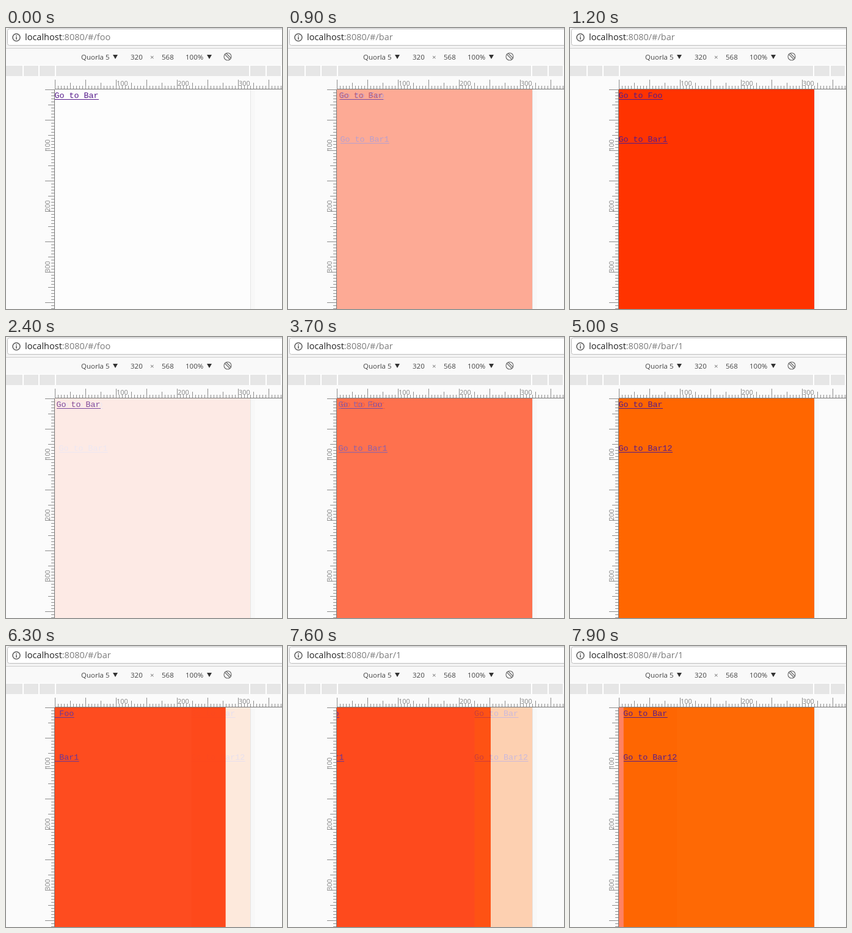
Animation of 452x462 px, one loop 8000 ms. Source, as an HTML page:

```html
<!DOCTYPE html>
<html lang="en">
<head>
<meta charset="utf-8">
<title>Route transitions</title>
<style>
  html, body { margin: 0; width: 100%; height: 100%; overflow: hidden; background: #fbfbfb; }
  svg { display: block; width: 452px; height: 462px; }
  text { white-space: pre; }
  .url { font: 14.5px "Open Sans", "Noto Sans", sans-serif; fill: #222; }
  .url .path { fill: #7c7c7c; }
  .bar { font: 11.5px "Open Sans", "Noto Sans", sans-serif; fill: #444; }
  .ruler { font: 11px "Open Sans", "Noto Sans", sans-serif; fill: #858585; }
  .link { font: 13.333px "Liberation Mono", monospace; }
</style>
</head>
<body>
<svg width="452" height="462">
  <defs><clipPath id="screen"><rect x="80" y="101" width="320" height="361"/></clipPath></defs>
  <rect width="452" height="462" fill="#fbfbfb"/>

  <!-- address bar -->
  <rect width="452" height="34" fill="#f3f3f3"/>
  <rect x="2.5" y="1.5" width="470" height="27" rx="3" fill="#fff" stroke="#bdbdbd"/>
  <rect y="33" width="452" height="1" fill="#d0d0d0"/>
  <circle cx="17" cy="15.5" r="6" fill="none" stroke="#5a5a5a" stroke-width="1.5"/>
  <path d="M17 14.5v4.5M17 12v1.6" stroke="#5a5a5a" stroke-width="1.6"/>
  <text class="url" x="31" y="20">localhost<tspan class="path">:8080/#/<tspan id="route"></tspan></tspan></text>

  <!-- device toolbar -->
  <rect y="34" width="452" height="28" fill="#f9f9f9"/>
  <g class="bar">
    <text x="123" y="52">Quorla 5</text>
    <text x="204" y="52">320</text>
    <text x="236" y="52" fill="#777">×</text>
    <text x="255" y="52">568</text>
    <text x="294" y="52">100%</text>
    <path d="M175 44h8l-4 7zM329 44h8l-4 7z" fill="#333"/>
  </g>
  <g fill="none" stroke="#666" stroke-width="1.1">
    <circle cx="363" cy="47" r="6"/>
    <path d="M358.5 43.5l8 8M360.5 41.5l8 8"/>
  </g>
  <rect y="61" width="452" height="18" fill="#fff"/>
  <rect y="62" width="452" height="17" fill="#e6e6e6"/>
  <path d="M28 62v17M54 62v17M81 62v17M399 62v17M426 62v17M451 62v17" stroke="#fff" stroke-width="2"/>

  <!-- device -->
  <rect x="400" y="101" width="8" height="361" fill="#f8f8f8"/>
  <rect x="400" y="101" width="1" height="361" fill="#e6e6e6"/>
  <g clip-path="url(#screen)">
    <rect x="80" y="101" width="320" height="361" fill="#fdfdfd"/>
    <g id="under"></g>
    <g id="over"></g>
  </g>
  <g id="rulers"></g>
</svg>
<script>
const LOOP = 8000, STEP = 100, WIDTH = 320;
const $ = id => document.getElementById(id);
const VISITED = '#551a8b';

const pages = {
  foo: { fill: '#fdfdfd', links: ['Go to Bar'] },
  bar: { fill: '#ff3300', links: ['Go to Foo', 'Go to Bar1'] },
  'bar/1': { fill: '#ff6600', links: ['Go to Bar', 'Go to Bar12'] }
};

// at: first visible step, start: transition start
const moves = [
  { at: 0, start: -1000, from: 'bar', to: 'foo', kind: 'fade' },
  { at: 900, start: 800, from: 'foo', to: 'bar', kind: 'fade' },
  { at: 2200, start: 2236, from: 'bar', to: 'foo', kind: 'fade' },
  { at: 3500, start: 3538, from: 'foo', to: 'bar', kind: 'fade' },
  { at: 4600, start: 4500, from: 'bar', to: 'bar/1', kind: 'forward' },
  { at: 6000, start: 6008, from: 'bar/1', to: 'bar', kind: 'back' },
  { at: 7600, start: 7500, from: 'bar', to: 'bar/1', kind: 'forward' }
];

// enter and leave: distance from rest and opacity there
const kinds = {
  fade: { time: 400, enter: 10, leave: 10, dim: 0, pad: true },
  forward: { time: 500, enter: WIDTH, leave: -0.72 * WIDTH, dim: 0.6 },
  back: { time: 500, enter: -WIDTH, leave: 0.8 * WIDTH, dim: 0 }
};

// cubic-bezier(.25, .1, .25, 1)
function ease(x) {
  if (x <= 0) return 0;
  if (x >= 1) return 1;
  const bezier = (s, a, b) => 3 * s * (1 - s) ** 2 * a + 3 * s * s * (1 - s) * b + s ** 3;
  let lo = 0, hi = 1;
  for (let i = 0; i < 24; i++) {
    const mid = (lo + hi) / 2;
    if (bezier(mid, .25, .25) < x) lo = mid; else hi = mid;
  }
  return bezier(lo, .1, 1);
}

function drawRulers() {
  let ticks = '', labels = '';
  for (let d = 0; d <= 375; d += 5) {
    const size = d % 50 === 0 ? 15 : d % 25 === 0 ? 10 : 5;
    ticks += `M${80.5 + d} 100v${-size}M79 ${101.5 + d}h${-size}`;
    if (d && d % 100 === 0) {
      labels += `<text x="${d + 81}" y="95">${d}</text>
        <text transform="translate(72 ${d + 102}) rotate(-90)">${d}</text>`;
    }
  }
  $('rulers').innerHTML = `<path d="${ticks}" stroke="#8c8c8c"/>
    <path d="M80 100.5H452M79.5 101V462" stroke="#777"/><g class="ruler">${labels}</g>`;
}

function pageMarkup(name) {
  const { fill, links } = pages[name];
  const items = links.map((label, i) => {
    const y = 115 + 72 * i;
    return `<text class="link" x="79.5" y="${y}">${label}</text>
      <rect x="80" y="${y + 2}" width="${label.length * 8}" height="1"/>`;
  }).join('');
  return `<rect x="80" y="101" width="${WIDTH}" height="361" fill="${fill}"/>
    <g fill="${VISITED}">${items}</g>`;
}

function place(layer, name, shift, opacity, pad) {
  if (layer.dataset.page !== name) {
    layer.dataset.page = name;
    layer.innerHTML = pageMarkup(name);
  }
  const move = x => `translate(${x.toFixed(2)} 0)`;
  layer.setAttribute('transform', move(pad ? 0 : shift));
  layer.lastElementChild.setAttribute('transform', move(pad ? shift : 0));
  layer.setAttribute('opacity', opacity.toFixed(3));
}

function render() {
  const t = Math.floor(performance.now() % LOOP / STEP) * STEP;
  const move = moves.filter(m => m.at <= t).pop();
  const kind = kinds[move.kind];
  const p = ease((t - move.start) / kind.time);
  place($('under'), move.from, kind.leave * p, p < 1 ? 1 - p * (1 - kind.dim) : 0, kind.pad);
  place($('over'), move.to, kind.enter * (1 - p), p, kind.pad);
  $('route').textContent = move.to;
  requestAnimationFrame(render);
}

drawRulers();
render();
</script>
</body>
</html>
```
